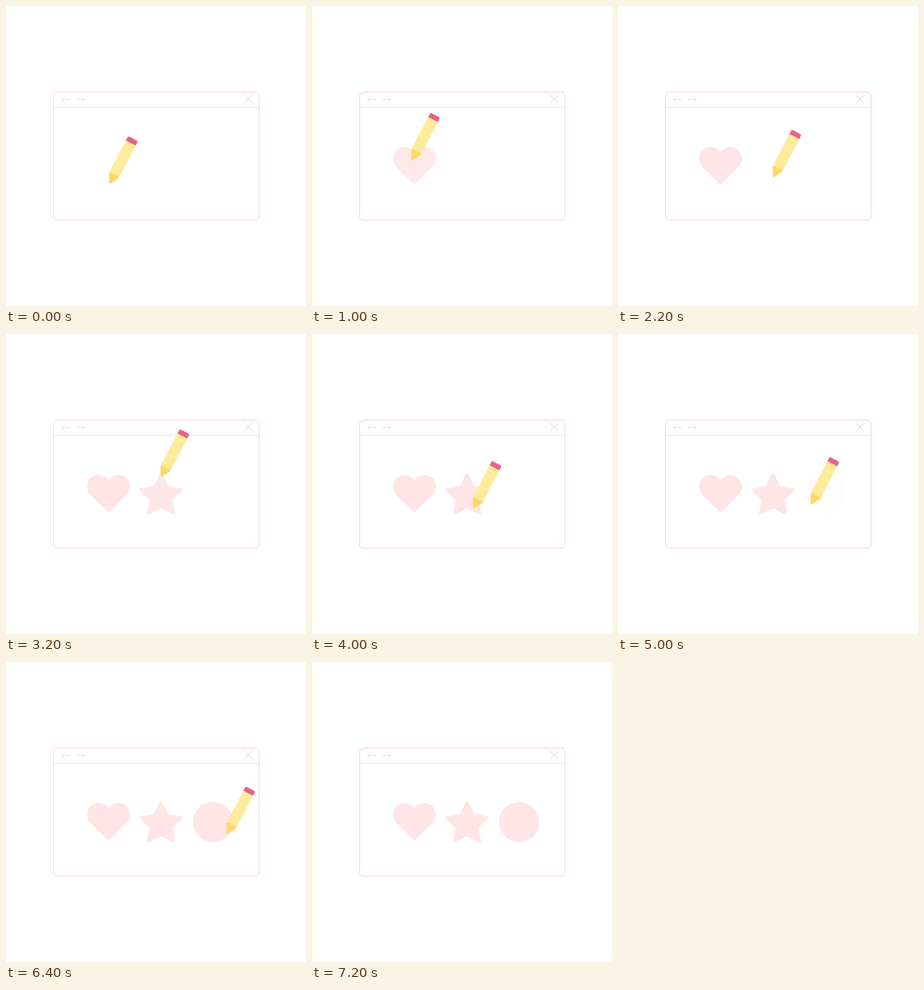
An HTML page for the animation above (8400 ms loop, 300x300 px).

```html
<!DOCTYPE html>
<html lang="en">
<head>
<meta charset="utf-8">
<title>Pencil drawing shapes</title>
<style>
  html, body { margin: 0; width: 100%; height: 100%; overflow: hidden; background: #fff; }
  svg { display: block; width: 100vw; height: 100vh; }
  .frame { fill: none; stroke: #fedde0; stroke-width: 1.2; }
  .icons { fill: none; stroke: #f8e2e2; stroke-width: 1; }
  .shape { fill: #ffe5e6; stroke: #ffe5e6; stroke-width: 0; stroke-linejoin: round; opacity: 0; }
  #star { stroke-width: 2.4; }
  .guide { fill: none; stroke: none; }
</style>
</head>
<body>
<svg viewBox="0 0 300 300">
  <rect class="frame" x="47.6" y="86.2" width="205.4" height="128" rx="4"/>
  <path class="frame" d="M48 101.5H253" style="stroke-width:1;stroke:#fce5e5"/>
  <g class="icons">
    <path d="M64 93.5H55.5M58.5 90.5l-3 3 3 3"/>
    <path d="M70 93.5H78.5M75.5 90.5l3 3-3 3"/>
    <path d="M238 89l8.500 8.500M246.500 89l-8.500 8.500" stroke="#f9d4d6"/>
  </g>

  <path class="shape" id="heart" d="M102.500 179L85 161.500C79.700 156 79.700 147.500 85.500 143.300C91 139.500 98.500 140.600 102.500 146.500C106.500 140.600 114 139.500 119.500 143.300C125.300 147.500 125.300 156 120 161.500Z"/>
  <path class="shape" id="star"/>
  <circle class="shape" id="disc" cx="207" cy="160" r="20"/>

  <!-- Routes of the pencil tip, clockwise from the bottom -->
  <path class="guide" id="heart-guide" d="M103 177L87 161C82 154 86 148 90 148Q95 148 99 153.700Q107 145 113 148C119 152 116 160 113 164L103 177"/>
  <path class="guide" id="star-guide"/>
  <path class="guide" id="disc-guide" d="M207 177.200a17 15.500 0 0 1 0-31a17 15.500 0 0 1 0 31"/>

  <g id="pencil">
    <path fill="#ffeb9c" d="M-5.500-9.500H5.500V-47H-5.500Z"/>
    <path fill="#ffd668" d="M-5.500-9.500Q-2.750-12.500 0-9.700Q2.750-12.500 5.500-9.500L.7-.4Q0 .4-.7-.4Z"/>
    <path fill="#e9608a" d="M-5.500-46V-49.500Q-5.500-51-4-51H4Q5.500-51 5.500-49.500V-46Z"/>
  </g>
</svg>
<script>
  const LOOP = 8400, STEP = 200;
  const HOP = 1.5, FADE_DELAY = 1.5, FADE = 6;
  const SHRINK_AT = 35, HIDE_AT = 36;

  const $ = id => document.getElementById(id);
  const clamp = v => Math.max(0, Math.min(1, v));
  const smooth = p => p * p * (3 - 2 * p);

  // Five-pointed star, clockwise from its lower notch
  function starPath(cx, cy, outer, inner) {
    let d = '';
    for (let i = 5; i <= 15; i++) {
      const r = i % 2 ? inner : outer, a = i * Math.PI / 5;
      d += `${d ? 'L' : 'M'}${cx + r * Math.sin(a)} ${cy - r * Math.cos(a)}`;
    }
    return d + 'Z';
  }
  $('star').setAttribute('d', starPath(155, 162, 21.6, 11));
  $('star-guide').setAttribute('d', starPath(154.5, 161, 19, 9.5));

  // Start and end of each trace, in steps
  const traces = [
    { id: 'heart', from: 1, to: 9 },
    { id: 'star', from: 11.5, to: 20.5 },
    { id: 'disc', from: 23.3, to: 33.5 }
  ];
  for (const trace of traces) {
    trace.shape = $(trace.id);
    trace.guide = $(trace.id + '-guide');
    trace.length = trace.guide.getTotalLength();
  }

  const pointOn = (trace, p) => trace.guide.getPointAtLength(trace.length * p);

  // Follow the current outline, then hop to the start of the next one
  function tipAt(k) {
    const i = traces.findIndex((trace, n) => !traces[n + 1] || k < traces[n + 1].from);
    const { from, to } = traces[i], next = traces[i + 1];
    const tip = pointOn(traces[i], clamp((k - from) / (to - from)));
    if (!next || k <= to) return tip;
    const goal = pointOn(next, 0), p = smooth(clamp((k - to) / HOP));
    return { x: tip.x + (goal.x - tip.x) * p, y: tip.y + (goal.y - tip.y) * p };
  }

  const pencil = $('pencil');

  function draw(k) {
    for (const { shape, from } of traces) {
      const p = clamp((k - from - FADE_DELAY) / FADE);
      shape.style.opacity = 1 - (1 - p) ** 4;
    }
    const { x, y } = tipAt(k);
    const size = k >= HIDE_AT ? 0 : k >= SHRINK_AT ? 0.71 : 1;
    pencil.style.display = size ? '' : 'none';
    pencil.setAttribute('transform', `translate(${x + 0.6} ${y + 0.8}) rotate(27.5) scale(${size})`);
  }

  const start = performance.now();
  function tick() {
    draw(Math.floor(((performance.now() - start) % LOOP) / STEP));
    requestAnimationFrame(tick);
  }
  tick();
</script>
</body>
</html>
```
